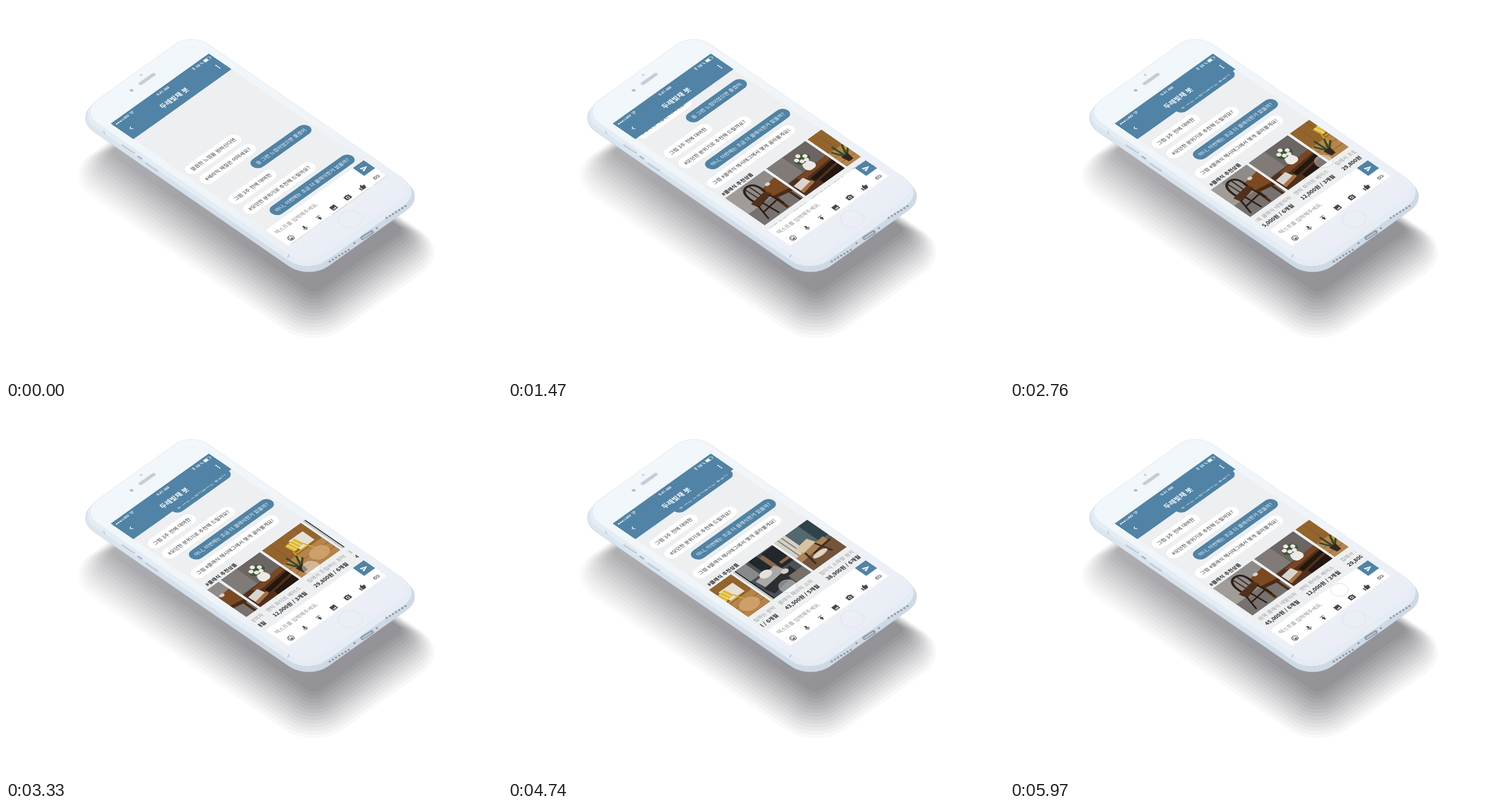
Write an HTML page that moves like this. It is 864 by 648 pixels and loops after 6 s.

```html
<!DOCTYPE html>
<html lang="ko">
<head>
<meta charset="utf-8">
<title>Chat bot on a phone</title>
<style>
html, body { margin: 0; width: 100%; height: 100%; overflow: hidden; background: #fff; }
body { position: relative; font-family: "Noto Sans CJK KR", "Noto Sans CJK JP", "Noto Sans CJK", sans-serif; }
#phone { position: absolute; left: 0; top: 0; }
.plane { position: absolute; left: 0; top: 0; width: 375px; height: 667px; transform-origin: 0 0;
  transform: matrix(.456, -.3253, .4618, .3178, 184, 206); }
.plane * { position: absolute; white-space: nowrap; }
#screen { clip-path: inset(-4px 0 0 0); background: #edeff1; }
#screen svg * { position: static; }
#chat { left: 0; top: 0; width: 375px; }
.bubble { height: 40px; line-height: 39px; padding: 0 15.5px; border-radius: 20px; font-size: 15.6px;
  background: #fff; color: #333; left: 9.6px; }
.me { left: auto; right: 10px; background: #5083a5; color: #fff; }
.tag { left: 11px; top: 637px; font: bold 15.6px/24px "Noto Sans CJK KR", "Noto Sans CJK JP", sans-serif; color: #222; }
#cards { left: 0; top: 664px; }
.card svg { left: 0; top: 0; }
.card span { left: 1px; top: 159px; font-size: 16px; line-height: 24px; color: #999; }
.card b { left: 1px; top: 185px; font-size: 16.5px; line-height: 24px; color: #222; }
#head { left: 0; top: 0; width: 375px; height: 82px; background: #5083a5; box-shadow: 0 -4px #5083a5; color: #fff; }
#head span { transform: translate(-50%, -50%); font: 500 12px/1 Roboto, sans-serif; }
#head .title { font: 700 21px/1 "Noto Sans CJK KR", "Noto Sans CJK JP", sans-serif; }
#input { left: 0; top: 581px; width: 375px; height: 86px; background: #fff; }
#input span { left: 11px; top: 14px; font-size: 16.3px; line-height: 24px; font-weight: 300; color: #888; }
#send { right: 0; top: 0; width: 42px; height: 43px; background: #5083a5; }
#cursor { width: 48px; height: 48px; margin: -25px; border: 1.6px solid #c4c6ca; border-radius: 50%;
  background: rgba(255, 255, 255, .42); }
</style>
</head>
<body>
<svg id="phone" width="864" height="648">
  <defs>
    <linearGradient id="face" x1="0" y1="0" x2="0" y2="1">
      <stop offset="0" stop-color="#f1f7fa"/><stop offset=".6" stop-color="#eff4f9"/><stop offset="1" stop-color="#eaedf5"/>
    </linearGradient>
    <linearGradient id="side" x1="0" y1="0" x2="0" y2="1">
      <stop offset="0" stop-color="#dde7ef"/><stop offset=".5" stop-color="#d5e0ea"/><stop offset="1" stop-color="#ced9e4"/>
    </linearGradient>
    <linearGradient id="shade" x1="0" y1="0" x2="0" y2="1">
      <stop offset="0" stop-color="#55555c" stop-opacity=".06"/><stop offset="1" stop-color="#55555c" stop-opacity=".1"/>
    </linearGradient>
  </defs>
  <g id="body"></g>
</svg>
<div id="screen" class="plane">
  <div id="chat"><div class="tag">#클래식 추천상품</div><div id="cards"></div></div>
  <div id="head">
    <svg width="375" height="82" fill="#fff" stroke="#fff" stroke-width="0">
      <g id="signal"></g>
      <path d="M63 6q6-5 12 0M65 9q4-3 8 0" fill="none" stroke-width="1.6"/><circle cx="69" cy="12" r="1.5"/>
      <path d="M302 5l6 6-3 3V3l3 3-6 6" fill="none" stroke-width=".9"/>
      <rect x="344" y="4" width="22" height="10" rx="2" fill="none" stroke-width="1"/>
      <rect x="345" y="5" width="12" height="8"/><rect x="367" y="7" width="2" height="4"/>
      <path d="M29 42l-6 6 6 6" fill="none" stroke-width="2.2"/>
      <circle cx="356" cy="42.5" r="2.3"/><circle cx="356" cy="49" r="2.3"/><circle cx="356" cy="55.5" r="2.3"/>
    </svg>
    <span style="left:50px;top:8px">NV</span>
    <span style="left:187px;top:9px">9:41 AM</span>
    <span style="left:327px;top:9px">58 %</span>
    <span class="title" style="left:189px;top:49px">두레빛채 봇</span>
  </div>
  <div id="input">
    <span>텍스트를 입력해주세요.</span>
    <div id="send"></div>
  </div>
</div>
<div class="plane"><div id="cursor"></div></div>
<script>
const $ = id => document.getElementById(id);
const add = (id, html) => $(id).insertAdjacentHTML('beforeend', html);
const repeat = (n, make) => Array.from({ length: n }, (_, i) => make(i)).join('');

// Phone: rounded slabs in the tilted plane, moved by screen pixels
const slab = (grow, dx, dy, attrs, extra = 0) =>
  `<rect transform="translate(${dx} ${dy}) matrix(.456 -.3253 .4618 .3178 184 206)"
    x="${-24 - grow}" y="${-93 - grow}" width="${423 + 2 * grow}" height="${853 + 2 * grow + extra}"
    rx="${Math.max(62 + grow, 20)}" ${attrs}/>`;
const line = (d, color, w) => `<path d="${d}" stroke="${color}" stroke-width="${w}" stroke-linecap="round" fill="none"/>`;
const holes = (x, y, n) => repeat(n, i =>
  `<ellipse cx="${x + 5.5 * i}" cy="${y - 3.4 * i}" rx="2" ry="1.7" fill="#8995a5"/>`);

// Shadow layers shrink and rise towards the phone
const shadow = repeat(14, i => slab(52 - 7 * i, 12, 111 - 3 * i, `fill="url(#shade)" opacity="${.4 + .05 * i}"`));

add('body',
  shadow +
  slab(12, -.5, 11, 'fill="url(#side)" stroke="#c9d5e0" stroke-width="1.5"', 9) +
  slab(7, 0, 5, 'fill="#e4ecf4"', 4) +
  slab(0, 0, 0, 'fill="url(#face)" stroke="#e3ebf3" stroke-width="2"') +
  line('M203 242l20 13M245 274l18 12', '#b4c2d0', 3.5) +
  line('M203 241l20 13M245 273l18 12', '#e3ebf2', 1.5) +
  line('M230 262l6 4', '#a9b8c7', 3) +
  line('M170 218l2 5M493 433l-2 5', '#b3c0cd', 1.5) +
  line('M621 404l16-10', '#8f9bab', 7) + line('M622 404l14-9', '#b9c3cf', 3) +
  holes(564, 445, 7) + holes(663, 369, 7) + holes(607, 413, 1) + holes(646, 387, 1) +
  `<g transform="matrix(.456 -.3253 .4618 .3178 184 206)">
    <circle cx="190" cy="713" r="32" fill="none" stroke="#dfe3ea" stroke-width="2"/>
    <rect x="160" y="-59" width="60" height="11" rx="5.5" fill="#c8cbd3" stroke="#dde2e9" stroke-width="2"/>
    <circle cx="130" cy="-53" r="5" fill="#b9bccb"/><circle cx="190" cy="-76" r="3.5" fill="#c8ccd6"/>
  </g>`);

// Chat
const lines = ['깔끔한 느낌을 원하신다면', '#세라믹 재질은 어떠세요?', '>응 그런 느낌이었으면 좋겠어', '그럼 3주 전에 대여한',
  '#모던한 분위기로 추천해 드릴까요?', '>아니, 이번에는 조금 더 클래식한거 없을까?', '그럼 #클래식 해시태그에서 몇개 골라볼게요!'];
add('chat', lines.map((s, i) =>
  `<div class="bubble${s[0] == '>' ? ' me' : ''}" style="top:${256 + 54.4 * i}px">${s.replace('>', '')}</div>`).join(''));

// Product pictures on a 150 x 150 field
const fill = (color, d) => `<path fill="${color}" d="${d}"/>`;
const dot = (color, x, y, rx, ry = rx) => `<ellipse fill="${color}" cx="${x}" cy="${y}" rx="${rx}" ry="${ry}"/>`;
const pictures = [
  fill('#8f8b88', 'M0 0h150v150H0z') + fill('#77726f', 'M0 88h150v62H0z') + fill('#a19c98', 'M0 0h55l-20 88H0z') +
  fill('#7b4a22', 'M88 48l62-10v58l-58-8z') + fill('#4a2b16', 'M92 86l58 10v14l-48-10-4 46h-8zM136 100h8v50h-8z') +
  line('M44 70Q40 12 72 12Q100 14 92 62', '#2c211b', 7) + line('M60 18l2 48M76 16v46', '#3a2a20', 4) +
  fill('#51301b', 'M32 66l62-8 6 20-62 14z') + line('M40 88l-14 50M58 86l4 56M92 78l6 46M36 112l58-8', '#2c1d15', 5) +
  dot('#d9d2c8', 118, 44, 8, 6),
  fill('#6b6664', 'M0 0h150v150H0z') + fill('#817b78', 'M0 0h60v80H0z') + fill('#50301c', 'M0 84l150-6v72H0z') +
  fill('#784623', 'M30 86l120-9v18L40 104z') + fill('#23170f', 'M56 112l94-10v14l-90 12zM70 134l80-10v26H70z') +
  fill('#d8d5d1', 'M4 100l40-5 8 34-46 8z') + fill('#a9713e', 'M6 126l48-8 2 10-48 10z') +
  dot('#3f5a35', 94, 44, 25, 18) + [[80, 36], [94, 27], [108, 40], [88, 49], [101, 53]].map(p => dot('#efe7e6', p[0], p[1], 7)).join('') +
  fill('#eceae7', 'M79 58h23q14 26-6 32H82q-18-8-3-32z'),
  fill('#94642d', 'M0 0h150v150H0z') + fill('#b5844a', 'M0 80h150v70H0z') +
  line('M30 0v80M62 0v80M120 0v80M0 104h150M0 128h150', '#7f5425', 1.5) +
  fill('#e6e0d5', 'M76 26h54v46H76z') + fill('#dcb82f', 'M54 34l40-4 5 31-41 5z') +
  line('M62 34l5 30M73 33l5 30M84 32l5 30', '#f0e2a0', 3) + line('M56 66l-8 34M98 60l10 32M60 74h42', '#d3ab28', 4) +
  dot('#cda06a', 104, 116, 32, 24) + line('M27 124L10 84M27 124l-2-54M28 124l22-42M28 122l29-24', '#33482a', 6) +
  fill('#33271d', 'M15 114h24l-4 26H19z'),
  fill('#4b5054', 'M0 0h150v150H0z') + fill('#c9cccd', 'M0 0h6v150H0z') + fill('#171717', 'M6 0h3v150H6z') +
  fill('#88898a', 'M9 0h38v58H9z') + fill('#22272b', 'M58 0h30v62H58zM104 4h46v78h-46z') +
  fill('#8a6748', 'M90 12h14v72H90zM116 60h34v10h-34z') + fill('#aaa9a6', 'M18 68l80-8 10 34-86 8z') +
  dot('#e4e1dc', 58, 67, 20, 14) + fill('#2b2d30', 'M14 104l112-14v30L22 138z') + fill('#77706a', 'M96 116h54v34H96z') +
  dot('#d3cfca', 102, 96, 12, 9),
  fill('#53686f', 'M0 0h150v150H0z') + fill('#d3d1cb', 'M0 0h42v84H0z') + line('M14 0v84M28 0v84', '#8f8270', 4) +
  fill('#30434b', 'M92 0h58v80H92z') + fill('#755439', 'M0 88h150v62H0z') + fill('#a98356', 'M0 84l112-9v18L0 106z') +
  fill('#d8c3a4', 'M22 58l52-8 9 26-54 8z') + line('M32 88l-8 46M78 80l13 50M50 104l66-8', '#422b1c', 6) + dot('#ded3c4', 60, 116, 26, 9)
];
const goods = ['원목 클래식 네발의자|45,000원 / 6개월', '앤틱 화이트 베이스|12,000원 / 3개월', '집에서 조립하는 원탁|29,800원 / 6개월',
  '클래식 패브릭 소파|43,500원 / 5개월', '접이식 소파형 왕자|38,900원 / 6개월'];
add('cards', goods.map((g, i) => {
  const [name, price] = g.split('|');
  return `<div class="card" style="left:${8 + 157 * i}px"><svg width="149" height="149" viewBox="0 0 150 150">${pictures[i]}</svg>
    <span>${name}</span><b>${price}</b></div>`;
}).join(''));

// Icons
add('signal', repeat(5, i => `<circle cx="${11 + 7 * i}" cy="9" r="2.6" ${i > 2 ? 'fill="none" stroke-width=".9"' : ''}/>`));
const icon = (x, y, art, color = '#484848') =>
  `<svg viewBox="0 0 24 24" width="23" height="23" fill="${color}" fill-rule="evenodd" style="left:${x - 11.5}px;top:${y - 11.5}px">${art}</svg>`;
const icons = [
  '<circle cx="12" cy="12" r="9" fill="none" stroke="#484848" stroke-width="2"/><path d="M7 13h10q-1 5-5 5t-5-5z"/><circle cx="8.5" cy="9" r="1.5"/><circle cx="15.5" cy="9" r="1.5"/>',
  '<path d="M12 14a3 3 0 0 0 3-3V5a3 3 0 0 0-6 0v6a3 3 0 0 0 3 3zm5-3a5 5 0 0 1-10 0H5a7 7 0 0 0 6 6.9V21h2v-3.1A7 7 0 0 0 19 11z"/>',
  '<path d="M5 4v2h14V4zm0 10h4v6h6v-6h4l-7-7z"/>',
  '<path d="M3 3h18v18H3zM8.5 13.5l2.5 3 3.5-4.5 4.5 6H5z"/>',
  '<path d="M9 2 7 4H2v16h20V4h-5l-2-2zm3 15a5 5 0 1 1 0-10 5 5 0 0 1 0 10z"/><circle cx="12" cy="12" r="3"/>',
  '<path d="M1 21h4V9H1zM23 8h-8.3l1-5L14.2 1 7 8.5V21h12l4-9z"/>',
  '<path d="M4 12a3 3 0 0 1 3-3h4V7H7a5 5 0 0 0 0 10h4v-2H7a3 3 0 0 1-3-3zm4 1h8v-2H8zm9-6h-4v2h4a3 3 0 0 1 0 6h-4v2h4a5 5 0 0 0 0-10z"/>'
];
add('input', icons.map((art, i) => icon(26 + 54.4 * i, 69, art)).join(''));
add('send', icon(21, 22, '<path d="M2 21l21-9L2 3v7l15 2-15 2z"/>', '#fff'));

// Smooth monotone curve through [time, value] keys
function track(keys, t) {
  const last = keys.length - 1;
  if (t <= keys[0][0]) return keys[0][1];
  if (t >= keys[last][0]) return keys[last][1];
  const i = keys.findIndex(k => k[0] > t) - 1;
  const slope = j => (keys[j + 1][1] - keys[j][1]) / (keys[j + 1][0] - keys[j][0]);
  const tangent = j => {
    if (j == 0 || j == last) return 0;
    const a = slope(j - 1), b = slope(j);
    return a * b <= 0 ? 0 : 2 * a * b / (a + b);
  };
  const [t0, v0] = keys[i], [t1, v1] = keys[i + 1], span = t1 - t0, p = (t - t0) / span, q = 1 - p;
  return v0 * q * q * (1 + 2 * p) + v1 * p * p * (3 - 2 * p) + span * p * q * (tangent(i) * q - tangent(i + 1) * p);
}
const chatY = [[330, 0], [690, 58.5], [1125, 58.5], [1620, 304.5]];
const cardX = [[2460, 0], [3330, 112], [4050, 230], [4740, 387], [4960, 420], [5670, 0]];
const handX = [[1920, 286], [2260, 296], [2460, 296], [3330, 257], [4050, 207], [4740, 158], [4960, 147], [5670, 235], [5970, 241]];
const handY = [[1920, 715], [2260, 499], [4960, 501], [5670, 440], [5970, 606]];

function draw() {
  const t = performance.now() % 6000;
  $('chat').style.transform = `translateY(${-track(chatY, t)}px)`;
  $('cards').style.transform = `translateX(${-track(cardX, t)}px)`;
  $('cursor').style.transform = `translate(${track(handX, t)}px, ${track(handY, t)}px)`;
  $('cursor').style.visibility = t < 1920 ? 'hidden' : 'visible';
  requestAnimationFrame(draw);
}
draw();
</script>
</body>
</html>
```
